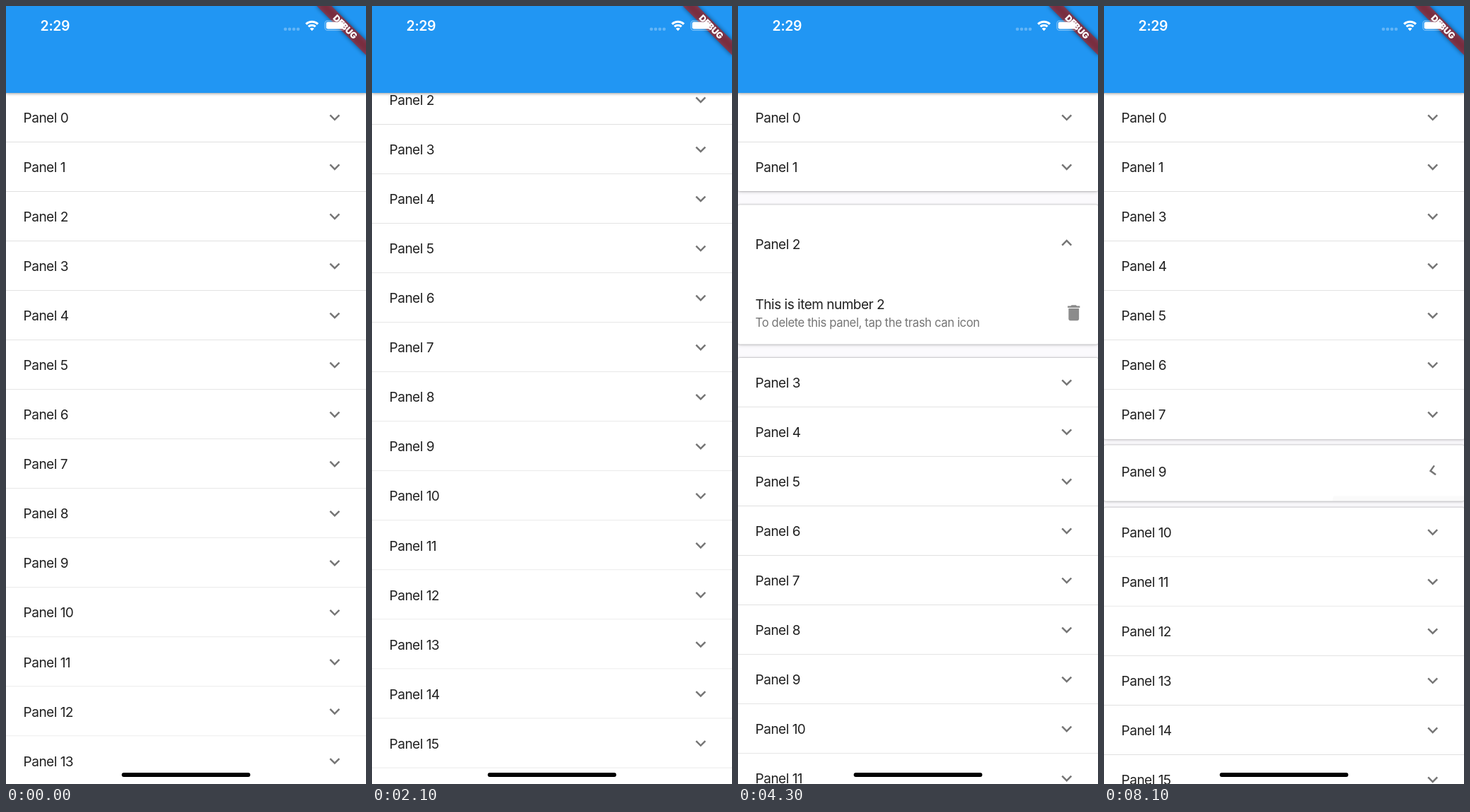
Recreate the animation shown at these times as an HTML page. Size 509x1101 px, loop 8200 ms.

```html
<!DOCTYPE html>
<html lang="en">
<head>
<meta charset="utf-8">
<title>Expansion panels</title>
<style>
  html, body { margin: 0; width: 100%; height: 100%; overflow: hidden; }
  #stage { position: relative; width: 509px; height: 1101px; overflow: hidden;
    background: #fbfafd; font-family: Inter, "Open Sans", sans-serif; color: #212121; }
  #list, .back, .row { position: absolute; left: 0; top: 0; width: 509px; }
  .back { background: #fff;
    box-shadow: 0 0 2px rgba(0,0,0,.48), 0 1px 5px rgba(0,0,0,.2); }
  .row { background: #fff; overflow: hidden; box-sizing: border-box; }
  .line { position: absolute; left: 0; right: 0; bottom: 0; height: 1.3px; background: #e0e0e0; }
  .head { position: absolute; left: 0; top: 0; width: 509px; height: 68.85px; }
  .head span, .body span { position: absolute; left: 24.6px; white-space: nowrap;
    font-size: 19px; letter-spacing: -.5px; }
  .head span { line-height: 71px; }
  .body { position: absolute; left: 0; width: 509px; height: 88.5px; overflow: hidden; }
  .body .title { top: 21px; line-height: 24px; }
  .body .sub { top: 47px; line-height: 22px; font-size: 16.6px; letter-spacing: -.35px; color: #757575; }
  .ink { position: absolute; border-radius: 50%; background: #c8c8c8; }
  svg { position: absolute; overflow: visible; }
  .head svg { left: 449.9px; top: 19.7px; width: 29.5px; height: 29.5px; fill: #757575; }
  .body svg { left: 459.8px; top: 29.5px; width: 29.5px; height: 29.5px; fill: #8c8c8c; }
  #bar { position: absolute; left: 0; top: 0; width: 509px; height: 122.95px; background: #2196f3;
    box-shadow: 0 1px 4px rgba(0,0,0,.4); }
  #clock { position: absolute; left: 48.6px; top: 16px; line-height: 24px; color: #fff;
    font-size: 19.4px; font-weight: 600; letter-spacing: -.3px; }
  #over { left: 0; top: 0; width: 509px; height: 1101px; }
</style>
</head>
<body>
<div id="stage">
  <div id="list"></div>
  <div id="bar"></div>
  <div id="clock">2:29</div>
  <svg id="over" viewBox="0 0 509 1101">
    <defs>
      <filter id="soft" x="-20%" y="-80%" width="140%" height="260%"><feGaussianBlur stdDeviation="3"/></filter>
    </defs>
    <g transform="translate(509 0) rotate(45)">
      <rect x="-49.2" y="34.4" width="98.4" height="14.8" fill="#000" fill-opacity=".5" filter="url(#soft)"/>
      <rect x="-52" y="34.4" width="104" height="14.8" fill="#b71c1c" fill-opacity=".627"/>
      <text x="0" y="46.2" text-anchor="middle" fill="#fff" font-family="Inter, sans-serif" font-size="12.5" font-weight="900" letter-spacing="-.3">DEBUG</text>
    </g>
    <g fill="#fff" fill-opacity=".3">
      <circle cx="395" cy="32.7" r="2.3"/><circle cx="401" cy="32.7" r="2.3"/>
      <circle cx="407" cy="32.7" r="2.3"/><circle cx="413" cy="32.7" r="2.3"/>
    </g>
    <g fill="none" stroke="#fff" stroke-width="3">
      <path d="M424.2 25.6a12.2 12.2 0 0 1 16.8 0M427.6 29.2a7.2 7.2 0 0 1 10 0"/>
      <path d="M432.6 35.2l-3-3.1a4.3 4.3 0 0 1 6 0z" fill="#fff" stroke="none"/>
    </g>
    <rect x="450.9" y="20.8" width="28.4" height="13.6" rx="4" fill="none" stroke="#fff" stroke-opacity=".4" stroke-width="1.2"/>
    <rect x="452.7" y="22.6" width="24.8" height="10" rx="2.4" fill="#fff"/>
    <path d="M480.6 25.4q2.4 2.2 0 4.4z" fill="#fff" fill-opacity=".45"/>
    <rect x="163.6" y="1085" width="181.8" height="6" rx="3" fill="#000"/>
  </svg>
</div>
<script>
const LOOP = 8200, DUR = 200, ROWS = 18;
const TOP = 122.95, HEAD = 68.85, LINE = 1.2, GAP = 19.67, BODY = 88.5;

// scroll offset by time; each value holds until the next
const scroll = [[0, 0], [1000, 5], [1100, 19], [1200, 36.5], [1300, 66], [1500, 136],
  [1700, 174], [1800, 187], [1900, 194], [2100, 165], [2200, 108], [2300, 48],
  [2500, -41], [2700, -45], [2900, -9], [3100, -1], [3300, 0]];
const panelSteps = [4100, 4200, 4300, 5300, 5400, 5500, 5600, 6800, 6900, 7100, 8000, 8100];
const steps = scroll.map(s => s[0]).concat(panelSteps);

// row that opens, panel it holds, opening and deletion times
const visits = [
  { row: 2, panel: 2, open: 4060, del: 5330 },
  { row: 7, panel: 8, open: 6870, del: 7966 }
];

const clamp = x => Math.max(0, Math.min(1, x));
const bez = (u, a, b) => 3 * u * (1 - u) * (1 - u) * a + 3 * u * u * (1 - u) * b + u * u * u;

function ease(x) {
  x = clamp(x);
  if (x === 0 || x === 1) return x;
  let lo = 0, hi = 1;
  for (let i = 0; i < 24; i++) {
    const m = (lo + hi) / 2;
    if (bez(m, .4, .2) < x) lo = m; else hi = m;
  }
  return bez(lo, 0, 1);
}

function add(parent, cls, html = '') {
  const el = document.createElement('div');
  el.className = cls;
  el.innerHTML = html;
  parent.appendChild(el);
  return el;
}

const list = document.getElementById('list');
const backs = [0, 1, 2].map(() => add(list, 'back'));
const rows = Array.from({ length: ROWS }, () => {
  const el = add(list, 'row');
  const ink = add(el, 'ink');
  const head = add(el, 'head', '<span></span><svg viewBox="0 0 24 24"><path d="M16.59 8.59L12 13.17 7.41 8.59 6 10l6 6 6-6z"/></svg>');
  const body = add(el, 'body', '<span class="title"></span><span class="sub">To delete this panel, tap the trash can icon</span>' +
    '<svg viewBox="0 0 24 24"><path d="M6 19c0 1.1.9 2 2 2h8c1.1 0 2-.9 2-2V7H6v12zM19 4h-3.5l-1-1h-5l-1 1H5v2h14V4z"/></svg>');
  const line = add(el, 'line');
  return { el, ink, head, body, line, name: head.querySelector('span'),
    icon: head.querySelector('svg'), title: body.querySelector('.title') };
});

function panelState(t) {
  const v = visits.find(v => t >= v.open && t < v.del + DUR);
  if (!v) return { row: -1, gap: 0, size: 0, fade: 0, ink: -1 };
  if (t < v.del) {
    const p = (t - v.open) / DUR, e = ease(p);
    return { row: v.row, gap: e, size: e, fade: ease((p - .4) / .6), ink: t - v.del };
  }
  const p = (t - v.del) / DUR, back = 1 - p;
  return { row: v.row, gap: ease(back), size: 1 - ease(p), fade: ease((back - .4) / .6), ink: t - v.del };
}

function place(el, y, h) {
  el.style.transform = `translateY(${y}px)`;
  el.style.height = h + 'px';
}

function drawInk(ink, age, y) {
  const on = age > -40;
  ink.style.display = on ? 'block' : 'none';
  if (!on) return;
  const r = Math.max(20, 30 + age * .866);
  const top = y + BODY / 2 - r;
  ink.style.left = 464 - r + 'px';
  ink.style.top = top + 'px';
  ink.style.width = ink.style.height = 2 * r + 'px';
  ink.style.opacity = .4 * clamp(1 - Math.max(0, age) / 180);
  // keep the ripple below the header
  ink.style.clipPath = `inset(${Math.max(0, y - top)}px 0 0 0)`;
}

function draw(time) {
  const t = Math.max(...steps.filter(s => s <= time));
  const off = scroll.filter(s => s[0] <= t).pop()[1];
  const gone = visits.filter(v => t >= v.del).map(v => v.panel);
  const names = Array.from({ length: ROWS + 2 }, (_, i) => i).filter(i => !gone.includes(i));
  const s = panelState(t), k = s.row;
  let y = TOP - off;
  const edges = [y];
  rows.forEach((r, i) => {
    const open = i === k, beside = k >= 0 && (open || i === k - 1);
    const pad = open ? GAP * s.size : 0;
    const size = open ? BODY * s.size : 0;
    const h = HEAD + 2 * pad + size + LINE * (beside ? 1 - s.gap : 1);
    const top = i === 0 || open || (k >= 0 && i === k + 1) ? 2.5 : 0;
    const low = beside ? 2.5 : 0;
    place(r.el, y, h);
    r.el.style.borderRadius = `${top}px ${top}px ${low}px ${low}px`;
    r.line.style.display = beside ? 'none' : 'block';
    r.name.textContent = 'Panel ' + names[i];
    r.head.style.top = pad + 'px';
    r.icon.style.transform = `rotate(${open ? 180 * s.gap : 0}deg)`;
    r.body.style.display = open ? 'block' : 'none';
    r.ink.style.display = 'none';
    if (open) {
      const by = HEAD + 2 * pad;
      r.title.textContent = 'This is item number ' + names[i];
      r.body.style.top = by + 'px';
      r.body.style.height = size + 'px';
      r.body.style.opacity = s.fade;
      drawInk(r.ink, s.ink, by);
    }
    y += h;
    if (beside) {
      edges.push(y);
      y += GAP * s.gap;
      edges.push(y);
    }
  });
  edges.push(y);
  backs.forEach((b, i) => {
    const used = edges.length > 2 * i + 1;
    b.style.display = used ? 'block' : 'none';
    b.style.borderRadius = '2.5px';
    if (used) place(b, edges[2 * i], edges[2 * i + 1] - edges[2 * i]);
  });
}

const start = performance.now();
function tick() {
  draw((performance.now() - start) % LOOP);
  requestAnimationFrame(tick);
}
tick();
</script>
</body>
</html>
```
